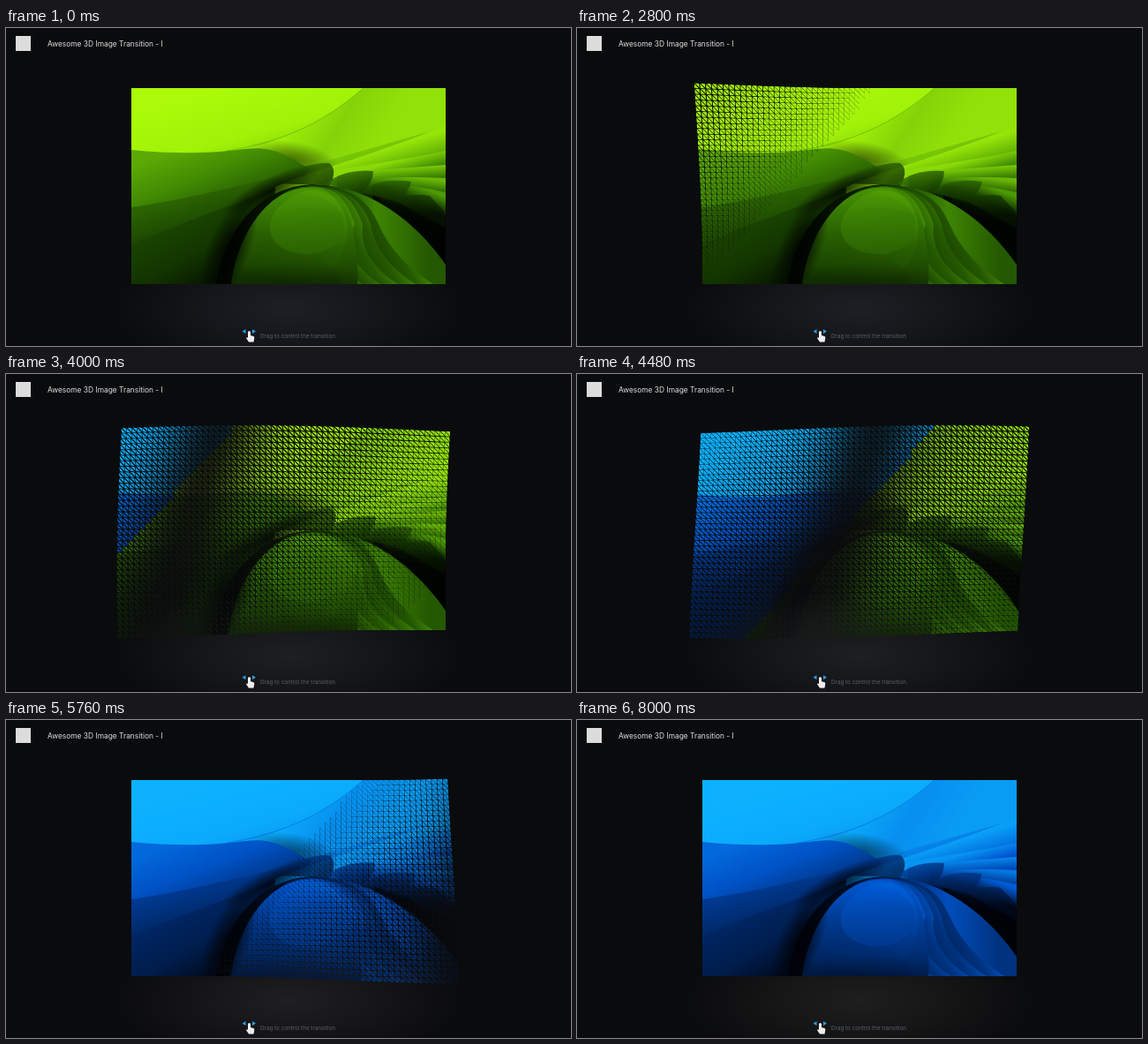
Animation of 640 by 360 pixels, one loop 8080 ms. Source, as an HTML page with a canvas:

```html
<!DOCTYPE html>
<html lang="en">
<head>
<meta charset="utf-8">
<title>Image transition</title>
<style>
  html, body { margin: 0; width: 100%; height: 100%; overflow: hidden; background: #0a0b0d; }
  canvas, svg { position: absolute; left: 0; top: 0; width: 640px; height: 360px; }
  text { font-family: Inter, "Open Sans", sans-serif; }
</style>
</head>
<body>
<canvas id="stage" width="640" height="360"></canvas>
<svg viewBox="0 0 640 360">
  <rect x="11" y="9" width="17" height="17" fill="#dcdcdc"/>
  <text x="47" y="20.5" font-size="8.4" fill="#dedede">Awesome 3D Image Transition - I</text>
  <g fill="#2b9be6">
    <path d="M267.5 343.5l4-2.5v5z"/>
    <path d="M283 343.5l-4-2.5v5z"/>
  </g>
  <path fill="#eee" d="M274 344q1.500-2 3 0v4l3.500 1q1 .5 .8 2l-.8 4.500h-5.500l-3-4.500q.5-1.500 2 0z"/>
  <text x="288" y="351" font-size="6.3" fill="#59616a">Drag to control the transition</text>
</svg>
<script>
const LOOP = 8080, STEP = 80, START = 1000, SPAN = 7000;
const BOX = { x: 142, y: 68, w: 356, h: 222 };
const COLS = 60, ROWS = 37, SLANT = 0.9, WIDTH = 700;
const REACH = BOX.w + SLANT * BOX.h + WIDTH;
const CX = 320, CY = 180;
const CW = BOX.w / COLS, CH = BOX.h / ROWS;
const ctx = document.getElementById('stage').getContext('2d');

// Four colour stops from black to the brightest tone.
const GREEN = [[0, 4, 0], [24, 66, 0], [72, 150, 4], [170, 250, 10]];
const BLUE = [[0, 2, 8], [0, 36, 96], [0, 88, 212], [12, 178, 255]];

function toneOf(stops) {
  return (l, a = 1) => {
    const k = Math.min(2, Math.floor(l * 3)), f = l * 3 - k;
    const rgb = stops[k].map((v, i) => Math.round(v + (stops[k + 1][i] - v) * f));
    return `rgba(${rgb},${a})`;
  };
}

function paint(stops) {
  const cv = document.createElement('canvas');
  cv.width = 640;
  cv.height = 360;
  const g = cv.getContext('2d');
  const tone = toneOf(stops);

  // Fills a path with a linear blend between tones, spread along a line.
  function sheet(d, line, tones, a = 1) {
    const grad = g.createLinearGradient(...line);
    tones.forEach((l, i) => grad.addColorStop(i / (tones.length - 1), tone(l, a)));
    g.fillStyle = grad;
    g.fill(new Path2D(d));
  }

  function shade(x, y, rx, ry, turn, a) {
    g.save();
    g.translate(x, y);
    g.rotate(turn);
    g.scale(rx, ry);
    const grad = g.createRadialGradient(0, 0, 0, 0, 0, 1);
    grad.addColorStop(0, tone(0, a));
    grad.addColorStop(0.5, tone(0, a * 0.55));
    grad.addColorStop(1, tone(0, 0));
    g.fillStyle = grad;
    g.fillRect(-1, -1, 2, 2);
    g.restore();
  }

  g.beginPath();
  g.rect(BOX.x, BOX.y, BOX.w, BOX.h);
  g.clip();

  // Bright sky and the sheet behind the thin curve.
  sheet('M142 68H498V290H142z', [260, 68, 290, 175], [1, 0.97, 0.82]);
  sheet('M405 68C370 98 325 128 255 140L330 160L498 112V68z', [330, 85, 420, 140], [0.97, 0.87, 0.92]);
  g.strokeStyle = tone(0.76, 0.7);
  g.lineWidth = 1;
  g.stroke(new Path2D('M405 68C370 98 325 128 250 139'));
  shade(322, 150, 55, 22, 0.15, 0.55);

  // Left waves.
  sheet('M142 138C190 143 235 142 270 137C305 133 318 145 345 160L320 190L240 290H142z',
    [190, 138, 220, 215], [0.73, 0.62, 0.42]);
  sheet('M142 203C190 196 245 184 320 165L300 200L245 290H142z',
    [200, 192, 225, 280], [0.47, 0.32, 0.14]);
  sheet('M142 246C190 222 250 205 310 178L270 225L245 290H142z',
    [190, 225, 230, 290], [0.33, 0.27, 0.1], 0.8);

  // Fan of blades on the right.
  sheet('M305 180C350 160 420 143 498 110V290H305z', [420, 140, 435, 190], [0.93, 0.72, 0.5]);
  sheet('M345 166C395 156 450 150 498 139V290H345z', [440, 151, 448, 180], [0.89, 0.66, 0.4]);
  sheet('M375 167C420 160 460 158 498 155V290H375z', [450, 158, 452, 184], [0.85, 0.58, 0.3]);
  sheet('M400 172C440 168 470 169 498 170V290H400z', [460, 169, 457, 195], [0.78, 0.48, 0.16]);
  sheet('M415 178C450 176 475 181 498 186V290H415z', [465, 179, 455, 206], [0.68, 0.3, 0.03]);
  sheet('M425 190C455 190 478 200 498 211V290H425z', [465, 194, 460, 216], [0.28, 0.05, 0]);

  // Translucent dark leaves over the ridge.
  sheet('M300 176Q335 152 366 153Q376 160 367 178z', [330, 155, 340, 182], [0.5, 0.24], 0.8);
  sheet('M362 176Q385 159 416 162Q416 175 403 188z', [380, 160, 390, 190], [0.52, 0.28], 0.8);
  sheet('M402 186Q420 169 459 174Q456 186 444 197z', [430, 168, 430, 197], [0.48, 0.2], 0.8);
  sheet('M442 196Q458 186 480 190L497 208V226z', [460, 185, 465, 215], [0.3, 0.08], 0.7);
  shade(300, 184, 62, 15, -0.45, 0.8);

  // Nested arches, from the outermost inwards.
  sheet('M238 290C248 225 290 180 345 177C410 176 465 220 498 268V290z',
    [240, 260, 480, 260], [0, 0.08, 0.3, 0.6, 0.42]);
  for (let i = 0; i < 5; i++) {
    const r = 484 - i * 20, top = 392 - i * 9, h = 200 - i * 3;
    sheet(`M262 290C270 225 300 182 340 180C${top + 5} 177 ${top + 20} ${h} ${top + 30} 222Q${r - 45} 262 ${r} 290z`,
      [r - 70, 262, r - 18, 232], [0.3, 0.42, 0.72 - i * 0.025]);
  }
  sheet('M255 290C262 235 295 183 340 181C372 180 388 203 393 228Q400 266 398 290z',
    [340, 182, 330, 290], [0.66, 0.46, 0.28]);
  sheet('M288 290C284 238 302 192 340 184C382 180 393 222 383 250Q374 275 350 290z',
    [345, 185, 320, 290], [0.7, 0.46, 0.3], 0.75);
  sheet('M299 230A42 36 0 0 1 384 223A42 33 0 0 1 342 256Q305 255 299 230z',
    [340, 190, 345, 258], [0.66, 0.55, 0.47], 0.8);
  sheet('M304 213Q335 195 381 211Q387 235 366 250Q335 235 304 213z',
    [345, 200, 350, 250], [0.6, 0.48], 0.6);
  sheet('M270 290Q300 256 345 258Q375 268 378 290z', [320, 256, 320, 290], [0.4, 0.26], 0.5);
  shade(252, 252, 24, 68, 0.38, 0.95);
  shade(320, 300, 130, 34, 0, 0.4);
  return cv;
}

const skins = [GREEN, BLUE].map(s => ctx.createPattern(paint(s), 'repeat'));

function backdrop(mix) {
  ctx.setTransform(1, 0, 0, 1, 0, 0);
  ctx.globalAlpha = 1;
  ctx.fillStyle = '#0a0b0d';
  ctx.fillRect(0, 0, 640, 360);
  ctx.setTransform(200, 0, 0, 75, 320, 318);
  const glow = ctx.createRadialGradient(0, 0, 0, 0, 0, 1);
  const rgb = `${30 + mix},${31 - mix},${37 - 7 * mix}`;
  glow.addColorStop(0, `rgba(${rgb},1)`);
  glow.addColorStop(0.5, `rgba(${rgb},.55)`);
  glow.addColorStop(1, `rgba(${rgb},0)`);
  ctx.fillStyle = glow;
  ctx.fillRect(-1, -1, 2, 2);
}

// One half cell, shrunk about its centroid, squeezed to its diagonal and lifted.
function shard(x, y, upper, p) {
  const cx = x + CW * (upper ? 2 : 1) / 3, cy = y + CH * (upper ? 1 : 2) / 3;
  const wave = Math.sin(Math.PI * p), bump = wave * wave;
  const lift = 1 + 0.095 * bump;
  const size = lift * (1 - 0.2 * Math.pow(wave, 0.8));
  const thin = 1 - 0.35 * bump;
  const a = size * (1 + thin) / 2, b = size * (1 - thin) / 2;
  ctx.setTransform(a, b, b, a,
    CX + (cx - CX) * lift - a * cx - b * cy,
    CY + (cy - CY) * lift - b * cx - a * cy);
  const dark = 0.47 + 0.00072 * (x - BOX.x) - 0.0006 * (y - BOX.y);
  ctx.globalAlpha = 1 - 0.85 * Math.exp(-(((p - dark) / 0.075) ** 2) / 2);
  ctx.beginPath();
  ctx.moveTo(x, y);
  ctx.lineTo(x + CW, y + CH);
  if (upper) ctx.lineTo(x + CW, y);
  else ctx.lineTo(x, y + CH);
  ctx.fill();
}

function draw(t) {
  const u = Math.min(1, Math.max(0, (t - START) / SPAN));
  const eased = (1 - Math.cos(Math.PI * u)) / 2;
  const front = REACH * eased;
  const still = [new Path2D(), new Path2D()];
  const moving = [];
  for (let r = 0; r < ROWS; r++) {
    for (let c = 0; c < COLS; c++) {
      const x = BOX.x + c * CW, y = BOX.y + r * CH;
      const d = (c + 0.5) * CW + SLANT * (r + 0.5) * CH;
      const p = (front - d) / WIDTH;
      if (p <= 0 || p >= 1) still[p >= 1 ? 1 : 0].rect(x, y, CW, CH);
      else moving.push([x, y, p]);
    }
  }
  backdrop(eased);
  ctx.setTransform(1, 0, 0, 1, 0, 0);
  still.forEach((path, i) => {
    ctx.fillStyle = skins[i];
    ctx.fill(path);
  });
  for (const [x, y, p] of moving) {
    ctx.fillStyle = skins[p > 0.52 ? 1 : 0];
    shard(x, y, false, p);
    shard(x, y, true, p);
  }
}

const begin = performance.now();
let shown = -1;
function tick() {
  const t = Math.floor(((performance.now() - begin) % LOOP) / STEP) * STEP;
  if (t !== shown) draw(shown = t);
  requestAnimationFrame(tick);
}
tick();
</script>
</body>
</html>
```
